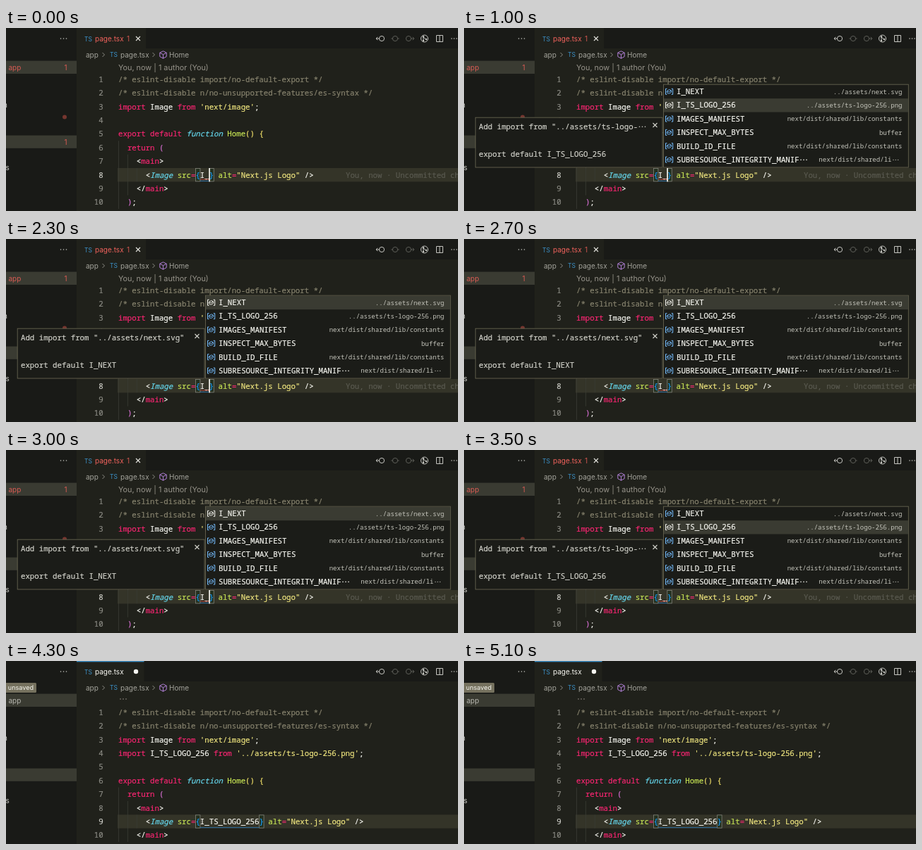
Animation of 640 by 260 pixels, one loop 5.2 s. Source, as an HTML page:

```html
<!DOCTYPE html>
<html lang="en">
<head>
<meta charset="utf-8">
<title>Editor auto import</title>
<style>
  html, body { margin: 0; width: 100%; height: 100%; overflow: hidden; background: #20211b; }
  svg { display: block; width: 640px; height: 260px; }
  text { white-space: pre; font-variant-ligatures: none; }
  text, tspan { fill: currentColor; }
  .code { font: 500 10.73px "Noto Sans Mono", "DejaVu Sans Mono", monospace; }
  .code, .code tspan { stroke: currentColor; stroke-width: .18; }
  .path { font: 9.05px "Noto Sans Mono", "DejaVu Sans Mono", monospace; }
  .ui { font: 10px Inter, Roboto, sans-serif; }
  .keyword { color: #f92672; }
  .plain { color: #f8f8f2; }
  .string { color: #f0e67f; }
  .type { color: #66d9ef; font-style: italic; }
  .name { color: #c8e655; }
  .comment { color: #88846f; }
  .gold { color: #f5e36a; }
  .orchid { color: #da70d6; }
  .blue { color: #179fff; }
</style>
</head>
<body>
<svg id="stage" viewBox="0 0 640 260" xmlns="http://www.w3.org/2000/svg"></svg>
<script>
const LOOP = 5200, OPEN = 900, UP = 2200, DOWN = 3200, ACCEPT = 3600;
const CHAR = 6.44, ROW = 19.35, LEFT = 159;
const EDITOR = '#20211b', SIDE = '#191a17', SELECTED = '#3a3b32', RED = '#d65b53';
const WHITE = '#f8f8f2', BLUE = '#75beff';

const esc = s => s.replace(/&/g, '&amp;').replace(/</g, '&lt;');
const rowTop = n => 199 + (n - 8) * ROW;
const rect = (x, y, w, h, fill, extra = '') =>
  `<rect x="${x}" y="${y}" width="${w}" height="${h}" fill="${fill}" ${extra}/>`;
const path = (d, color, width = 1) =>
  `<path d="${d}" fill="none" stroke="${color}" stroke-width="${width}"/>`;
const dot = (x, y, r, fill) => `<circle cx="${x}" cy="${y}" r="${r}" fill="${fill}"/>`;
const ring = (x, y, r, color) =>
  `<circle cx="${x}" cy="${y}" r="${r}" fill="none" stroke="${color}"/>`;
const dots = (x, y, color, gap = 4, r = .8) =>
  [0, 1, 2].map(i => dot(x + i * gap, y, r, color)).join('');
const text = (x, y, s, cls, color, extra = '') =>
  `<text x="${x}" y="${y}" class="${cls}" color="${color}" ${extra}>${esc(s)}</text>`;
const group = (id, body) => `<g id="${id}">${body}</g>`;
const cross = (x, y, color) =>
  path(`M${x - 3} ${y - 3}l6 6m0-6l-6 6`, color, 1.1);

// One code line: tokens alternate between class and text.
function line(n, indent, ...tokens) {
  let spans = '';
  for (let i = 0; i < tokens.length; i += 2)
    spans += `<tspan class="${tokens[i]}">${esc(tokens[i + 1])}</tspan>`;
  return `<text class="code" x="${LEFT + indent * CHAR}" y="${rowTop(n) + 13.5}">${spans}</text>`;
}

function gutter(active) {
  let out = '';
  for (let n = 1; n <= 10; n++)
    out += text(137.7, rowTop(n) + 13.5, String(n), 'code',
      n === active ? '#d0d0ca' : '#8b8b84', 'text-anchor="end"');
  return out;
}

// The component body, with its first line at row n.
function component(n, value) {
  const tag = n + 3, top = rowTop(tag);
  const open = LEFT + 17 * CHAR, close = open + (value.length + 1) * CHAR;
  const guide = (col, from, to) => path(
    `M${LEFT + col * CHAR + .5} ${rowTop(from)}V${rowTop(to)}`, '#3c3d35', .8);
  const bracket = x => rect(x, top + .5, CHAR, ROW - 1, '#24301f',
    'stroke="#84847c" stroke-width=".8"');
  return rect(158, top, 482, ROW, '#343428') +
    guide(0, n + 1, 11) + guide(2, n + 2, n + 5) + guide(4, tag, tag + 1) +
    bracket(open) + bracket(close) +
    path(`M${open + CHAR} ${top + ROW - 1}H${close}`, '#2c79b5', .9) +
    line(n, 0, 'keyword', 'export default ', 'type', 'function', 'name', ' Home',
      'gold', '() {') +
    line(n + 1, 2, 'keyword', 'return ', 'orchid', '(') +
    line(n + 2, 4, 'plain', '<', 'keyword', 'main', 'plain', '>') +
    line(tag, 6, 'plain', '<', 'type', 'Image', 'name', ' src', 'keyword', '=',
      'blue', '{', 'plain', value, 'blue', '}', 'name', ' alt', 'keyword', '=',
      'string', '"Next.js Logo"', 'plain', ' />') +
    line(n + 4, 4, 'plain', '</', 'keyword', 'main', 'plain', '>') +
    (n + 5 > 10 ? '' : line(n + 5, 2, 'orchid', ')', 'plain', ';')) +
    gutter(tag);
}

function toolbar() {
  const on = '#c5c5c0', off = '#5c5d57';
  const commit = (x, c) => ring(x, 15, 3.6, c);
  return commit(532, on) + path('M528.4 15h-4.4M526.2 12.8l-2.2 2.2 2.2 2.2', on) +
    commit(551, off) + path('M547.4 15h-2M554.6 15h2', off) +
    commit(570, off) + path('M573.6 15h4.4M575.8 12.8l2.2 2.2-2.2 2.2', off) +
    ring(592.5, 15, 5, on) + path('M591 11v8M591 13l3.5 3', on) +
    dot(591, 12.5, 1.2, on) + dot(591, 18, 1.2, on) + dot(595, 16, 1.2, on) +
    path('M609.5 10.5h9v9h-9zM614 10.5v9', on) + dots(631, 15, on, 3.5);
}

function base() {
  const small = 'font-weight="600" style="font-size:8.5px"';
  return rect(0, 0, 640, 260, EDITOR) + rect(0, 0, 100, 260, SIDE) +
    rect(198, 0, 442, 29, SIDE) +
    dots(77.5, 15, '#c5c5c0') +
    rect(0, 46.6, 100, 18.4, SELECTED) + rect(0, 152.6, 100, 18.2, SELECTED) +
    text(-4, 113, 'n', 'ui', '#d0d0ca') + text(-.5, 201.5, 's', 'ui', '#d0d0ca') +
    text(111, 18.5, 'TS', 'ui', '#3c93cc', small) +
    text(113, 41.7, 'app', 'ui', '#a3a39b') +
    path('M136.5 35l3 3-3 3M207.5 35l3 3-3 3', '#8c8c84') +
    text(147, 41.3, 'TS', 'ui', '#3c93cc', small) +
    text(162, 41.7, 'page.tsx', 'ui', '#a3a39b') +
    path('M222.5 32.8l4.7 2.4v5.4l-4.7 2.6-4.7-2.6v-5.4zM217.8 35.2l4.7 2.5 4.7-2.5M222.5 37.7v5.5', '#b180d7') +
    text(231, 41.7, 'Home', 'ui', '#a3a39b') + toolbar() +
    line(1, 0, 'comment', '/* eslint-disable import/no-default-export */') +
    line(2, 0, 'comment', '/* eslint-disable n/no-unsupported-features/es-syntax */') +
    line(3, 0, 'keyword', 'import', 'plain', ' Image ', 'keyword', 'from ',
      'string', "'next/image'", 'plain', ';');
}

function before() {
  return text(3.4, 59.6, 'app', 'ui', RED) + text(82.5, 59.6, '1', 'ui', RED) +
    text(82.5, 165.5, '1', 'ui', RED) + dot(83, 126.5, 3, '#75362f') +
    text(126, 18.7, 'page.tsx', 'ui', '#f0625c') + text(171, 18.7, '1', 'ui', '#d0564f') +
    cross(187, 15, '#e5e5df') +
    text(159, 59.6, 'You, now | 1 author (You)', 'ui', '#96938a', 'style="font-size:10.85px"') +
    component(5, 'I_') +
    path('M275.5 216l2-2 2 2 2-2 2 2 2-2 2 2', '#d8403a', .8) +
    text(481, rowTop(8) + 13.5, 'You, now · Uncommitted changes', 'code', '#5a5a50');
}

function after() {
  return rect(195.5, 0, 2.5, 29, SIDE) + rect(100, 0, 95.5, 1.3, '#3a8fc8') +
    text(3.4, 59.6, 'app', 'ui', '#b5b5ad') +
    rect(-4, 31, 47, 14, '#75715e', 'rx="1.5"') +
    text(-3.5, 41.3, '1 unsaved', 'ui', WHITE, 'font-weight="500" style="font-size:9.1px"') +
    text(126, 18.7, 'page.tsx', 'ui', WHITE) + dot(184, 15, 3.2, WHITE) +
    dots(162, 54, '#96938a') +
    line(4, 0, 'keyword', 'import', 'plain', ' I_TS_LOGO_256 ', 'keyword', 'from ',
      'string', "'../assets/ts-logo-256.png'", 'plain', ';') +
    component(6, 'I_TS_LOGO_256');
}

const ITEMS = [
  ['I_NEXT', '../assets/next.svg'],
  ['I_TS_LOGO_256', '../assets/ts-logo-256.png'],
  ['IMAGES_MANIFEST', 'next/dist/shared/lib/constants'],
  ['INSPECT_MAX_BYTES', 'buffer'],
  ['BUILD_ID_FILE', 'next/dist/shared/lib/constants'],
  ['SUBRESOURCE_INTEGRITY_MANIF', 'next/dist/shared/li']
];

function popup(selected) {
  const frame = 'stroke="#66634f" stroke-width=".9"', bg = '#1b1c18', faint = '#c4c4bb';
  let out = rect(282.5, 80.2, 346.8, 117.8, bg, frame) +
    rect(283, 80.8 + selected * ROW, 346, ROW, SELECTED);
  ITEMS.forEach(([label, source], i) => {
    const y = 90.3 + i * ROW, cut = i === 5, icon = i === selected ? WHITE : BLUE;
    out += path(`M287.5 ${y - 4}h-2v8h2M293.7 ${y - 4}h2v8h-2`, icon) +
      path(`M287.4 ${y - .8}l3.4-2 2.8 1.4v2.4l-3.4 2-2.8-1.4zM287.4 ${y - .8}l2.8 1.4 3.4-2`, icon, .9) +
      text(301, y + 3.8, label, 'code', WHITE) +
      text(cut ? 605.5 : 620.5, y + 3.4, source, 'path', faint, 'text-anchor="end"');
    if (cut) out += dots(477, y + .3, WHITE) + dots(608, y + .3, faint, 3.3, .7);
  });
  const long = selected === 1, ink = '#d2d2ca';
  return out + rect(16.2, 127.2, 264.8, 70.8, bg, frame) +
    text(21, 143.9, 'Add import from "../assets/' + (long ? 'ts-logo-' : 'next.svg"'), 'code', ink) +
    (long ? dots(248.5, 140.3, ink) : '') +
    text(21, 182.7, 'export default ' + ITEMS[selected][0], 'code', ink) +
    cross(270.5, 138, ink);
}

const $ = id => document.getElementById(id);
$('stage').innerHTML = base() + group('before', before()) + group('after', after()) +
  group('first', popup(0)) + group('second', popup(1)) +
  rect(0, 0, 1.6, ROW, WHITE, 'id="cursor"');

const show = (id, on) => $(id).setAttribute('visibility', on ? 'visible' : 'hidden');

function draw(t) {
  const done = t >= ACCEPT, open = t >= OPEN && !done;
  const first = t >= UP && t < DOWN;
  show('before', !done);
  show('after', done);
  show('first', open && first);
  show('second', open && !first);
  // Accepting the suggestion restarts the blink.
  show('cursor', (done ? t - ACCEPT : t + 100) % 1000 < 500);
  $('cursor').setAttribute('x', LEFT + (done ? 31 : 20) * CHAR - .5);
  $('cursor').setAttribute('y', rowTop(done ? 9 : 8));
}

function tick() {
  draw(performance.now() % LOOP);
  requestAnimationFrame(tick);
}
tick();
</script>
</body>
</html>
```
